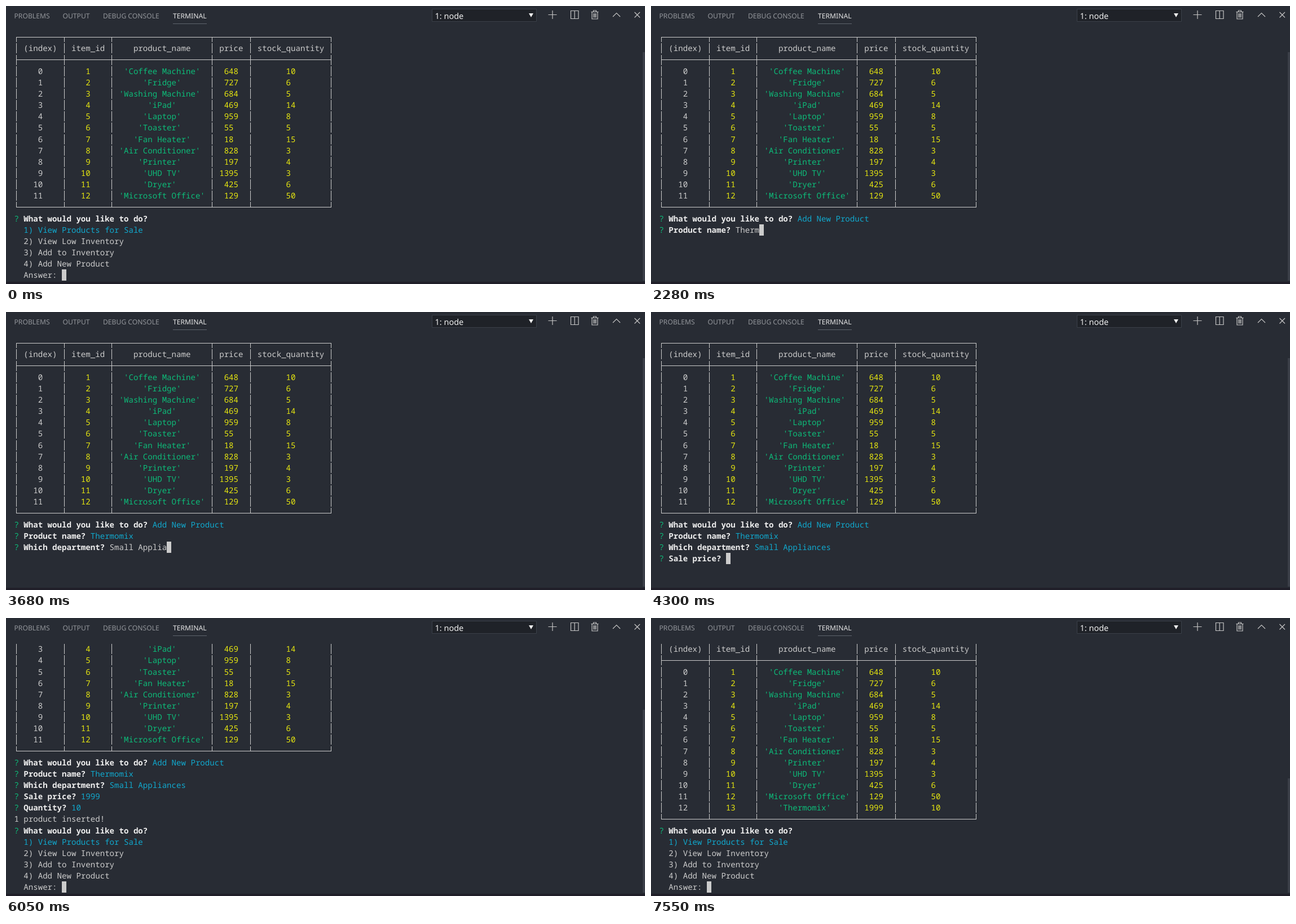
These frames come from a looping animation (1133 by 494 pixels, 9.53 s). An HTML page with a canvas:

```html
<!DOCTYPE html>
<html lang="en">
<head>
<meta charset="utf-8">
<title>Inventory terminal</title>
<style>
  html, body { margin: 0; width: 100%; height: 100%; overflow: hidden; background: #282c34; }
  canvas { display: block; }
</style>
</head>
<body>
<canvas id="stage" width="1133" height="494"></canvas>
<script>
const ctx = document.getElementById('stage').getContext('2d');
const LOOP = 9530, ROWS = 22;
const LEFT = 14.4, TOP = 45.2, CHAR_W = 8.46, ROW_H = 20.15;
const FG = '#cccccc', BOLD = '#eeeeee', GREEN = '#0dbc79', YELLOW = '#e5e510', CYAN = '#11a8cd';
const MONO = '14.1px "Noto Sans Mono", monospace';
const CURSOR = { cursor: true };

const seg = (text, color = FG, bold = false) => ({ text, color, bold });

// ---- table ----
const WIDTHS = [9, 9, 20, 7, 16];
const HEADERS = ['(index)', 'item_id', 'product_name', 'price', 'stock_quantity'];
const PRODUCTS = [
  ['Coffee Machine', 648, 10], ['Fridge', 727, 6], ['Washing Machine', 684, 5],
  ['iPad', 469, 14], ['Laptop', 959, 8], ['Toaster', 55, 5],
  ['Fan Heater', 18, 15], ['Air Conditioner', 828, 3], ['Printer', 197, 4],
  ['UHD TV', 1395, 3], ['Dryer', 425, 6], ['Microsoft Office', 129, 50],
];

function center(value, width) {
  const text = String(value);
  return text.padStart(text.length + Math.floor((width - text.length) / 2)).padEnd(width);
}

function tableRow(cells, colors = []) {
  return [seg('│'), ...cells.flatMap((cell, i) => [seg(center(cell, WIDTHS[i]), colors[i]), seg('│')])];
}

function rule(left, middle, right) {
  return [seg(left + WIDTHS.map(w => '─'.repeat(w)).join(middle) + right)];
}

function table(products) {
  return [
    rule('┌', '┬', '┐'),
    tableRow(HEADERS),
    rule('├', '┼', '┤'),
    ...products.map(([name, price, stock], i) =>
      tableRow([i, i + 1, `'${name}'`, price, stock], [FG, YELLOW, GREEN, YELLOW, YELLOW])),
    rule('└', '┴', '┘'),
  ];
}

const oldTable = table(PRODUCTS);
const newTable = table([...PRODUCTS, ['Thermomix', 1999, 10]]);

// ---- prompts ----
const OPTIONS = ['View Products for Sale', 'View Low Inventory', 'Add to Inventory', 'Add New Product'];
const TASK = 'What would you like to do?';

const ask = (question, ...rest) => [seg('?', GREEN), seg(' '), seg(question + ' ', BOLD, true), ...rest];

function menu(selected, typed) {
  return [
    ask(TASK),
    ...OPTIONS.map((name, i) => [seg(`  ${i + 1}) ${name}`, i + 1 === selected ? CYAN : FG)]),
    [seg('  Answer: ' + typed), CURSOR],
  ];
}

// keys: [time, number of characters visible from then on]
const QUESTIONS = [
  { text: 'Product name?', answer: 'Thermomix', start: 1370, end: 2570,
    keys: [[2020, 1], [2110, 2], [2190, 3], [2280, 5], [2360, 6], [2510, 9]] },
  { text: 'Which department?', answer: 'Small Appliances', start: 2570, end: 4300,
    keys: [[2810, 1], [2890, 2], [2980, 3], [3060, 5],
      ...Array.from({ length: 10 }, (_, i) => [3210 + 78 * i, 6 + i]), [4160, 16]] },
  { text: 'Sale price?', answer: '1999', start: 4300, end: 5350,
    keys: [[4680, 1], [4760, 2], [4910, 3], [4970, 4]] },
  { text: 'Quantity?', answer: '10', start: 5350, end: 5980,
    keys: [[5580, 1], [5740, 2]] },
];

function questionLine({ text, answer, end, keys }, t) {
  if (t >= end) return ask(text, seg(answer, CYAN));
  const count = keys.reduce((n, [time, typed]) => t >= time ? typed : n, 0);
  return ask(text, seg(answer.slice(0, count)), CURSOR);
}

function buffer(t) {
  if (t >= 7550) return [...newTable, ...menu(1, '')];
  if (t < 840) return [...oldTable, ...menu(1, '')];
  if (t < 1370) return [...oldTable, ...menu(4, '4')];

  const lines = [...oldTable, ask(TASK, seg(OPTIONS[3], CYAN)),
    ...QUESTIONS.filter(q => t >= q.start).map(q => questionLine(q, t))];
  if (t < 5980) return lines;
  if (t < 6050) return [...lines, [CURSOR]];

  lines.push([seg('1 product inserted!')]);
  const blank = n => Array.from({ length: n }, () => []);
  if (t < 6910) return [...lines, ...menu(1, '')];
  if (t < 7020) return [...lines, [CURSOR], ...blank(5)];
  if (t < 7460) return [...lines, ...menu(1, '1')];
  return [...lines, ask(TASK, seg(OPTIONS[0], CYAN)), ...blank(5)];
}

// ---- drawing ----
function rect(color, x, y, w, h) {
  ctx.fillStyle = color;
  ctx.fillRect(x, y, w, h);
}

function stroke(path, color = '#c5c5c5', width = 1.2) {
  ctx.strokeStyle = color;
  ctx.lineWidth = width;
  ctx.stroke(new Path2D(path));
}

function label(text, x, y, size, color) {
  ctx.font = `${size}px "Noto Sans", "Open Sans", sans-serif`;
  ctx.fillStyle = color;
  ctx.fillText(text, x, y);
}

function drawBoxChar(char, x, y) {
  const cx = Math.floor(x + CHAR_W / 2), cy = Math.floor(y + 10);
  const up = '│├┼┤└┴┘'.includes(char), down = '│├┼┤┌┬┐'.includes(char);
  const left = '─┬┼┴┐┤┘'.includes(char), right = '─┬┼┴┌├└'.includes(char);
  const top = Math.round(y + 1), bottom = Math.round(y + 19);
  if (up) rect(FG, cx, top, 1, cy + 1 - top);
  if (down) rect(FG, cx, cy, 1, bottom - cy);
  const from = left ? Math.floor(x) : cx;
  if (left || right) rect(FG, from, cy, (right ? Math.ceil(x + CHAR_W) : cx + 1) - from, 1);
}

function drawLine(line, row) {
  const y = TOP + row * ROW_H;
  let col = 0;
  for (const part of line) {
    if (part.cursor) {
      rect(FG, Math.round(LEFT + col * CHAR_W), Math.round(y), 8, 20);
      continue;
    }
    ctx.font = (part.bold ? 'bold ' : '') + MONO;
    for (const char of part.text) {
      const x = LEFT + col++ * CHAR_W;
      if (char >= '─' && char <= '┼') {
        drawBoxChar(char, x, y);
      } else if (char !== ' ') {
        ctx.fillStyle = part.color;
        ctx.fillText(char, x, y + 15);
      }
    }
  }
}

function drawHeader() {
  const dim = '#93969b', bright = '#e7e7e7';
  label('PROBLEMS', 14.5, 21.5, 12.15, dim);
  label('OUTPUT', 100.5, 21.5, 12.15, dim);
  label('DEBUG CONSOLE', 172, 21.5, 12.15, dim);
  label('TERMINAL', 296, 21.5, 12.15, bright);
  rect('#5f646d', 296, 31, 60, 1);

  rect('#1f2228', 755, 5, 186, 23);
  stroke('M755.5 5.5h185v22h-185z', '#3b4049', 1);
  label('1: node', 760.5, 22.5, 14.5, '#f0f0f0');
  ctx.fillStyle = '#f0f0f0';
  ctx.fill(new Path2D('M927 13h8l-4 7z'));

  stroke('M961.5 15.5h15M969 8v15');
  stroke('M1001.5 8.5h13.5v14h-13.5zM1008.2 8.5v14');
  stroke('M1037.5 10.5h13M1041.5 10.5v-2.5h5v2.5M1039 10.5v12.5h10v-12.5M1042 13v7.5M1044 13v7.5M1046 13v7.5');
  stroke('M1076 19l6.5-6.5l6.5 6.5');
  stroke('M1114.5 11l9.5 9.5M1124 11l-9.5 9.5');
}

function draw(t) {
  rect('#282c34', 0, 0, 1133, 494);
  drawHeader();
  buffer(t).slice(-ROWS).forEach(drawLine);
  const thumbTop = t < 6050 ? 82 : t < 7550 ? 163 : 285;
  rect('#3b3f48', 1129, thumbTop, 4, 488 - thumbTop);
  rect('#201f29', 0, 490, 1133, 4);
}

ctx.textRendering = 'geometricPrecision';
const start = performance.now();
function tick() {
  draw((performance.now() - start) % LOOP);
  requestAnimationFrame(tick);
}
tick();
</script>
</body>
</html>
```
